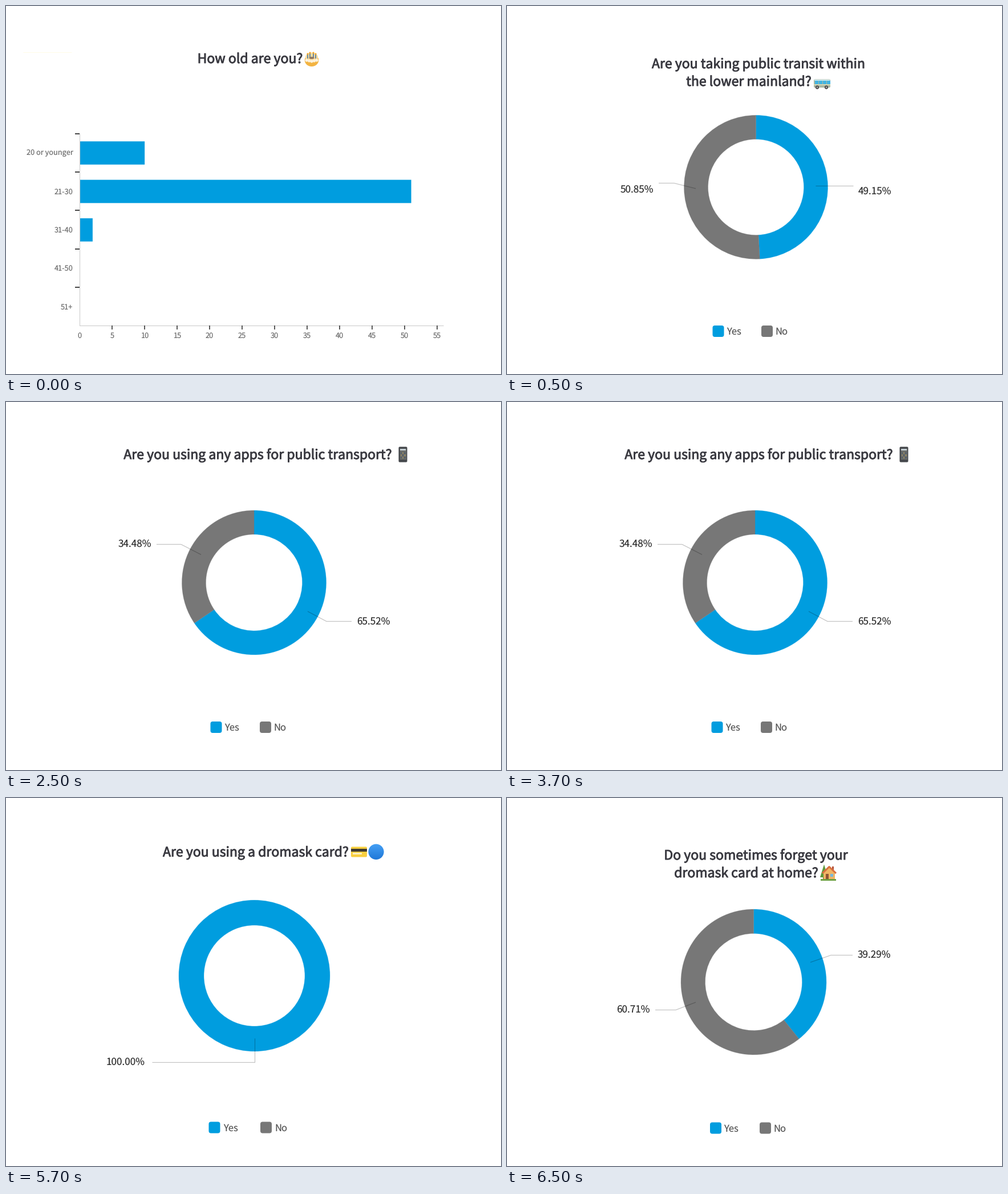
Recreate the animation shown at these times as a matplotlib script. Size 868 by 645 pixels, loop 8 s.

```python
import numpy as np
import matplotlib.pyplot as plt
from matplotlib.animation import FuncAnimation
from matplotlib.colors import LinearSegmentedColormap, to_rgba
from matplotlib.patches import Circle, Ellipse, FancyBboxPatch, Polygon, Rectangle, Wedge
from matplotlib.patheffects import withStroke

W, H, DPI = 868, 645, 64
PT = 72 / DPI  # points per pixel
BLUE, GRAY, INK = "#009ddf", "#777777", "#3b3b42"
TITLE_SIZE, VALUE_SIZE, LEGEND_SIZE, AXIS_SIZE = 23, 17.1, 16.6, 12.8
STEP_MS = 500
STARTS_MS = [0, 500, 2500, 4500, 6500]
LOOP_MS = 8000

plt.rcParams.update({"font.family": "Noto Sans CJK JP", "text.hinting": "none"})
fig = plt.figure(figsize=(W / DPI, H / DPI), dpi=DPI, facecolor="white")


def new_scene():
    ax = fig.add_axes([0, 0, 1, 1])
    ax.set(xlim=(0, W), ylim=(H, 0))
    ax.axis("off")
    return ax


def text(ax, x, y, s, size, color="#2e2e2e", ha="left"):
    return ax.text(x, y, s, fontsize=size * PT, color=color, ha=ha, va="baseline")


def title(ax, x, y, s):
    # A thin outline turns the regular face into a semibold.
    label = text(ax, x, y, s, TITLE_SIZE, INK, ha="center")
    label.set_path_effects([withStroke(linewidth=0.9 * PT, foreground=INK)])


def line(ax, points, color, width, **kw):
    xs, ys = zip(*points)
    ax.plot(xs, ys, color=color, lw=width * PT, solid_capstyle="butt", **kw)


def soft(color):
    return dict(fc=color, ec=to_rgba(color, 0.3), lw=PT, snap=False)


def rect(ax, x0, y0, x1, y1, color):
    ax.add_patch(Rectangle((x0, y0), x1 - x0, y1 - y0, color=color, lw=0))


def rounded(ax, x0, y0, x1, y1, color, radius):
    style = f"round,pad=0,rounding_size={radius}"
    ax.add_patch(FancyBboxPatch((x0, y0), x1 - x0, y1 - y0, boxstyle=style, fc=color, lw=0))


def poly(ax, points, color):
    ax.add_patch(Polygon(points, color=color, lw=0))


def dot(ax, x, y, r, color):
    ax.add_patch(Circle((x, y), r, color=color, lw=0))


def oval(ax, x, y, w, h, color):
    ax.add_patch(Ellipse((x, y), w, h, color=color, lw=0))


def ring(ax, cx, cy, outer, inner, yes):
    split = -90 + 3.6 * yes
    for start, end, color in ((-90, split, BLUE), (split, 270, GRAY)):
        if end > start:
            ax.add_patch(Wedge((cx, cy), outer, start, end, width=outer - inner, **soft(color)))


def callout(ax, points, x, y, s):
    line(ax, points, "black", 1.2, alpha=0.24, zorder=3)
    text(ax, x, y, s, VALUE_SIZE)


def legend(ax, top, yes_x, yes_text, no_x, no_text):
    for x, label_x, label, color in ((yes_x, yes_text, "Yes", BLUE), (no_x, no_text, "No", GRAY)):
        rounded(ax, x, top, x + 20, top + 20, color, 4)
        text(ax, label_x, top + 16, label, LEGEND_SIZE, "#555555")


def cake(ax):
    oval(ax, 536, 95, 24.5, 22, "#f3b442")
    oval(ax, 536, 90, 22, 17, "#fbdc9c")
    for x in (527, 531.5, 536, 540.5, 545):
        dot(ax, x, 97 - abs(x - 536) / 5, 2.6, "#fdf2dc")
    for x, y in ((529, 85), (533, 83), (539, 83), (543, 85)):
        rect(ax, x - 1.2, y, x + 1.2, y + 7, "#6389a6")
        dot(ax, x, y - 1, 1.5, "#f5a623")
    oval(ax, 536, 91, 9, 4, "#94795f")


def bus(ax):
    rounded(ax, 538, 128.5, 567, 143, "#a9b7a4", 2)
    rect(ax, 539, 128.5, 566, 131, "#c9e6ea")
    for x in (540, 547, 554, 561):
        rect(ax, x, 131, x + 5.5, 136.5, "#41b4e2")
    rect(ax, 538, 137, 567, 139, "#d8d6b0")
    for x in (544, 560):
        dot(ax, x, 142.5, 3.2, "#4a4a4a")
        dot(ax, x, 142.5, 1.3, "#b5b5b5")


def phone(ax):
    rounded(ax, 688.5, 78.5, 703.5, 105.5, "#45484c", 2)
    rect(ax, 690.5, 82, 701.5, 101, "#6b6d69")
    rect(ax, 691, 82, 701, 85, "#c2ccd0")
    for row in range(3):
        for col in range(3):
            color = "#8d8262" if (row + col) % 2 else "#56606a"
            rect(ax, 691.5 + 3.4 * col, 88 + 4 * row, 693.7 + 3.4 * col, 90.5 + 4 * row, color)


def card(ax):
    rounded(ax, 605, 85.5, 633, 103.5, "#f9cf3f", 2)
    rect(ax, 605, 89, 633, 94, "#3f3a30")
    rect(ax, 608, 96, 624, 98.5, "#fdf1c2")


def ball(ax):
    shades = LinearSegmentedColormap.from_list("ball", ["#45a0f5", "#1f78d8"])
    image = ax.imshow(np.linspace(0, 1, 32)[:, None], cmap=shades, aspect="auto",
                      extent=(635, 663, 108.5, 80.5), interpolation="bilinear")
    image.set_clip_path(Circle((649, 94.3), 13.6, transform=ax.transData))


def house(ax):
    rect(ax, 553.5, 136, 556.5, 144, "#8a5a34")
    poly(ax, [(549, 139), (556, 116.5), (563, 139)], "#5f9a3c")
    poly(ax, [(555, 131), (565, 121), (575, 131), (575, 143), (555, 143)], "#f0b565")
    rect(ax, 570, 120, 573, 127, "#b5533a")
    line(ax, [(553, 132), (565, 120.5), (577, 132)], "#d9703f", 3)
    rect(ax, 558.5, 133, 564, 143, "#8f5433")
    rect(ax, 567, 133, 572, 138, "#79b9dc")
    rect(ax, 550, 142, 577, 144.5, "#6ea043")


def age_scene(ax):
    left, bottom, unit = 129, 559.5, 11.4
    line(ax, [(30, 80.5), (115, 80.5)], "#fffbe6", 1)
    title(ax, 428, 100, "How old are you?")
    cake(ax)
    line(ax, [(left, 223), (left, bottom), (767, bottom)], "#d0d0d0", 1.2)
    rows = (("20 or younger", 10), ("21-30", 51), ("31-40", 2), ("41-50", 0), ("51+", 0))
    for i, (label, count) in enumerate(rows):
        y = 223.5 + 67.4 * i
        line(ax, [(121, y), (left, y)], "#333333", 1.8)
        text(ax, 117.5, y + 38.5, label, AXIS_SIZE, "#707070", ha="right")
        if count:
            ax.add_patch(Rectangle((left + 0.5, y + 13.9), unit * count - 0.5, 40.4, **soft(BLUE)))
    for value in range(0, 60, 5):
        x = left + unit * value
        if value:
            line(ax, [(x, 560), (x, 567)], "#333333", 1.6)
        text(ax, x, 581.5, str(value), AXIS_SIZE, "#707070", ha="center")


def transit_scene(ax):
    title(ax, 441, 109, "Are you taking public transit within")
    title(ax, 424, 140, "the lower mainland?")
    bus(ax)
    ring(ax, 436.5, 317.5, 126, 84, 49.15)
    callout(ax, [(541, 314.5), (607, 314.5)], 615.5, 331, "49.15%")
    callout(ax, [(266, 310.5), (293, 310.5), (331, 320)], 198.5, 328, "50.85%")
    legend(ax, 560, 360.5, 385, 446, 470.5)


def apps_scene(ax):
    title(ax, 441.5, 100, "Are you using any apps for public transport?")
    phone(ax)
    ring(ax, 435, 316.5, 126.5, 84.5, 65.52)
    callout(ax, [(529, 367), (562, 384.5), (606, 384.5)], 615, 390.5, "65.52%")
    callout(ax, [(264, 249.5), (307, 249.5), (342, 267.5)], 196.5, 255, "34.48%")
    legend(ax, 560, 358.5, 383.5, 445, 469)


def card_scene(ax):
    title(ax, 438, 102.5, "Are you using a dromask card?")
    card(ax)
    ball(ax)
    ring(ax, 435.5, 311.5, 132.5, 88.5, 100)
    callout(ax, [(435.5, 421), (435.5, 462.5), (256, 462.5)], 175.5, 469, "100.00%")
    legend(ax, 567.5, 355.5, 381, 446, 471)


def home_scene(ax):
    title(ax, 436.5, 108, "Do you sometimes forget your")
    title(ax, 419.5, 139, "dromask card at home?")
    house(ax)
    ring(ax, 432.5, 322.5, 127.5, 85, 39.29)
    callout(ax, [(532, 288), (568, 275.5), (606, 275.5)], 614.5, 280.5, "39.29%")
    callout(ax, [(260, 371.5), (296, 371.5), (331, 358)], 192.5, 377, "60.71%")
    legend(ax, 568.5, 356, 380.5, 443, 467)


scenes = []
for draw in (age_scene, transit_scene, apps_scene, card_scene, home_scene):
    scenes.append(new_scene())
    draw(scenes[-1])


def update(frame):
    current = np.searchsorted(STARTS_MS, frame * STEP_MS, side="right") - 1
    for i, ax in enumerate(scenes):
        ax.set_visible(i == current)
    return scenes


anim = FuncAnimation(fig, update, frames=LOOP_MS // STEP_MS, interval=STEP_MS,
                     init_func=lambda: update(0), repeat=True, repeat_delay=0, blit=False)
plt.show()
```
